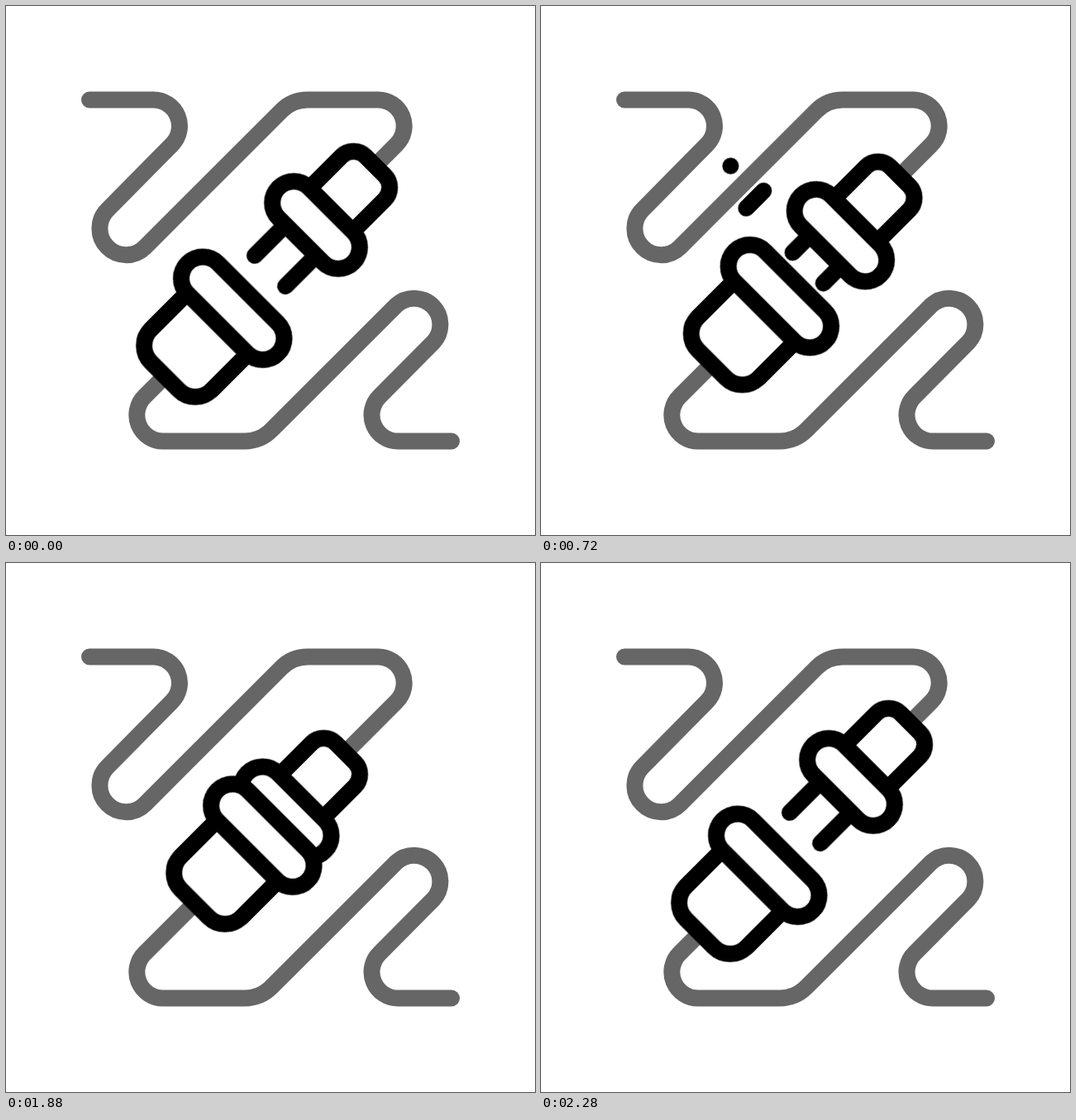
Recreate the animation shown at these times as an HTML page. Size 640 by 640 pixels, loop 2420 ms.

```html
<!DOCTYPE html>
<html lang="en">
<head>
<meta charset="utf-8">
<title>Plug and socket</title>
<style>
  html, body { margin: 0; height: 100%; overflow: hidden; background: #fff; }
  svg { display: block; width: 100vw; height: 100vh; }
  path, rect { stroke: #000; stroke-width: 20; stroke-linecap: round; stroke-linejoin: round; fill: #fff; }
  .cable { stroke: #666; fill: none; }

  .plug, .socket, .flange, .prongs, .streak {
    animation: 2420ms cubic-bezier(.42, 0, .42, 1) infinite;
  }
  .plug { animation-name: plug; }
  .socket { animation-name: socket; }
  .flange { animation-name: flange; }
  .prongs { animation-name: prongs; stroke-dasharray: 52.5 100; fill: none; }

  @keyframes plug {
    0%, 5.785%, 94.215%, 100% { transform: translateX(0); }
    27.355% { transform: translateX(33.9px); }
    32.975%, 69.421% { transform: translateX(-72.1px); }
  }
  @keyframes socket {
    0%, 5.785%, 94.215%, 100% { transform: translateX(0); }
    27.355% { transform: translateX(-28.3px); }
    32.975%, 69.421% { transform: translateX(72.1px); }
  }
  @keyframes flange {
    0%, 82.6%, 100% { y: -64px; height: 128px; }
    27.355% { y: -64px; height: 128px; animation-timing-function: cubic-bezier(.55, 0, .55, 1); }
    32.975%, 69.421% { y: -77.3px; height: 154.6px; }
  }
  @keyframes prongs {
    0%, 27.355%, 94.215%, 100% { stroke-dashoffset: 0; }
    32.975%, 69.421% { stroke-dashoffset: 47px; }
  }

  /* --at: tail position midway, --len: dash length midway, --run: lane length */
  .streak {
    fill: none; opacity: 0;
    stroke-dasharray: .1 400;
    animation-timing-function: linear;
  }
  .left { --run: -273px; animation-name: left; }
  .right { --run: -233px; animation-name: right; }

  @keyframes left {
    0%, 27.6%, 32.98%, 72.02%, 77.4%, 100% { opacity: 0; }
    27.603%, 72.025% { opacity: 1; stroke-dasharray: .1 400; stroke-dashoffset: 0; }
    29.81%, 74.232% { opacity: 1; stroke-dasharray: var(--len) 400; stroke-dashoffset: var(--at); }
    32.975%, 77.397% { opacity: 1; stroke-dasharray: .1 400; stroke-dashoffset: var(--run); }
  }
  @keyframes right {
    0%, 34.5%, 40.293%, 78.922%, 84.715%, 100% { opacity: 0; }
    34.504%, 78.926% { opacity: 1; stroke-dasharray: .1 400; stroke-dashoffset: 0; }
    38.223%, 82.645% { opacity: 1; stroke-dasharray: var(--len) 400; stroke-dashoffset: var(--at); }
    40.289%, 84.711% { opacity: 1; stroke-dasharray: .1 400; stroke-dashoffset: var(--run); }
  }
</style>
</head>
<body>
<svg viewBox="0 0 640 640">
  <path class="cable" d="M101 113.5H178.3A31.7 31.7 0 0 1 200.7 167.6L122.8 246.5
    A31.7 31.7 0 0 0 168 291.8L333.2 126.7A45 45 0 0 1 365 113.5H449.5
    A31.7 31.7 0 0 1 472.1 167.9L390.7 249.3"/>
  <path class="cable" d="M249.3 390.7L167.9 472.1A31.7 31.7 0 0 0 190.5 526.5H289
    A45 45 0 0 0 320.8 513.3L472.1 362.1A31.7 31.7 0 0 1 516.9 406.9L452.1 472.1
    A31.7 31.7 0 0 0 474.5 526.5H539"/>

  <!-- x runs up the plug axis, y across it -->
  <g transform="translate(320 320) rotate(-45)">
    <path class="streak left" style="--at: -102px; --len: 30px" d="M133.6 -104H-139.4"/>
    <path class="streak left" style="--at: -109px; --len: .1px" d="M133.6 -153.5H-139.4"/>
    <path class="streak right" style="--at: -99.7px; --len: 70px" d="M-128.7 111H104.3"/>
    <path class="streak right" style="--at: -96.2px; --len: 39.6px" d="M-128.7 160H104.3"/>

    <g class="plug">
      <path class="prongs" d="M51.8 -26.2H-.7"/>
      <path class="prongs" d="M51.8 26.2H-.7"/>
      <path d="M77.8 -36.9H158.5a20.5 20.5 0 0 1 20.5 20.5V16.4a20.5 20.5 0 0 1 -20.5 20.5H77.8"/>
      <rect class="flange" x="51.8" y="-64" width="52" height="128" rx="26" ry="26"/>
    </g>
    <g class="socket">
      <path d="M-64.7 -52H-152.7a28 28 0 0 0 -28 28V24a28 28 0 0 0 28 28H-64.7"/>
      <rect x="-90.7" y="-77.3" width="52" height="154.6" rx="26"/>
    </g>
  </g>
</svg>
</body>
</html>
```
